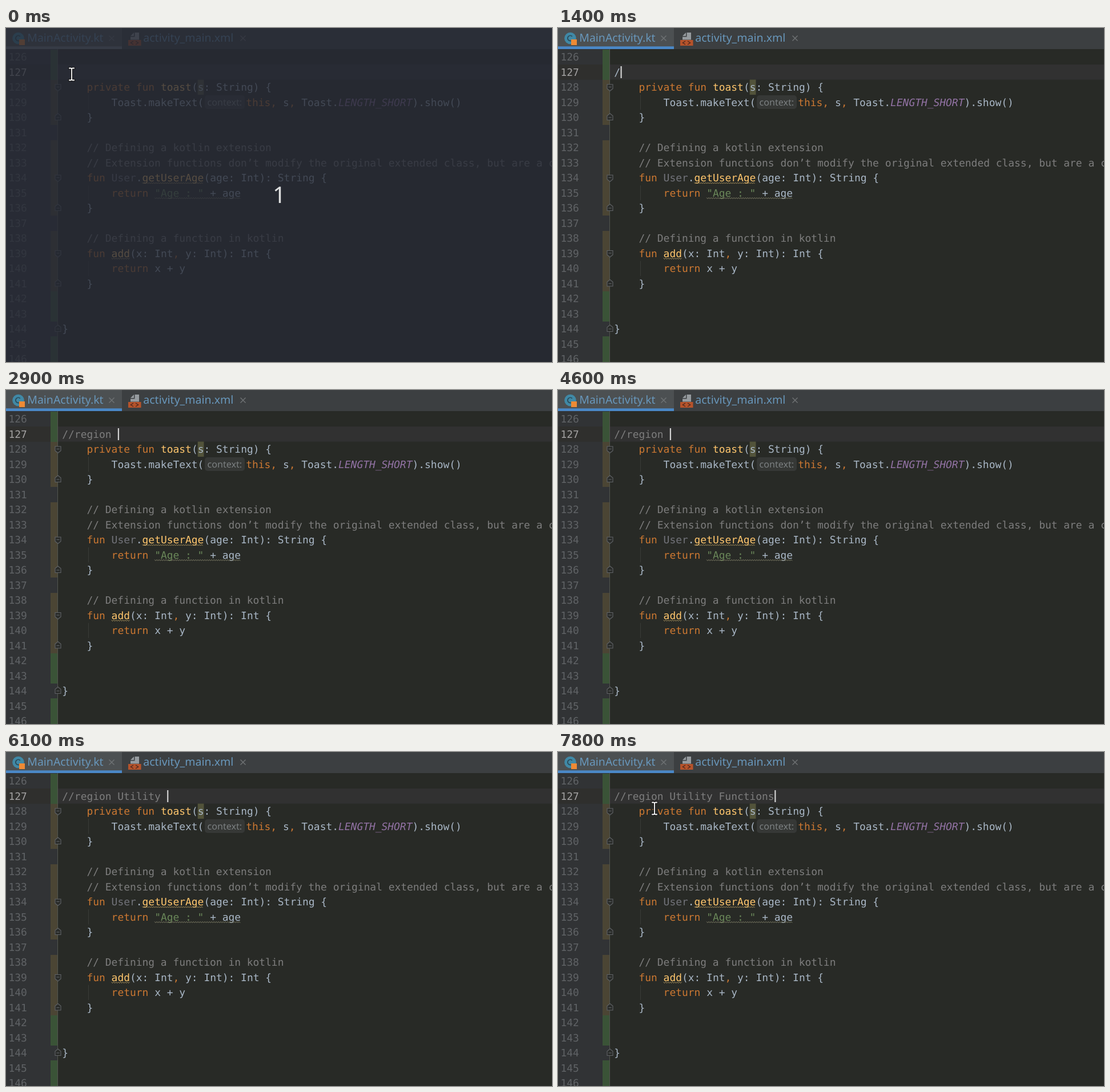
Recreate the animation shown at these times as an HTML page with a canvas. Size 956 px wide and 586 px high, loop 8 s.

```html
<!DOCTYPE html>
<html lang="en">
<head>
<meta charset="utf-8">
<title>Code editor</title>
<style>
  html, body { margin: 0; width: 100%; height: 100%; overflow: hidden; background: #282a26; }
  canvas { display: block; }
</style>
</head>
<body>
<canvas id="stage" width="956" height="586"></canvas>
<script>
const ctx = document.getElementById('stage').getContext('2d');
const W = 956, H = 586, LOOP = 8000;
const FIRST = 126, ROW = 26.5, LEFT = 98.3, CHAR = 10.79;
const MONO = '17.92px "DejaVu Sans Mono", monospace';
const SLASHES = '/'.repeat(2);
const sans = size => `${size}px "Noto Sans", sans-serif`;
const C = {
  text: '#a9b7c6', key: '#cc7832', fn: '#ffc66d', comment: '#7d7d7d', string: '#6a8759',
  constant: '#9373a5', unused: '#72737a', green: '#3a5337', brown: '#4b4534', line: '#606366'
};

// Each entry: row, column, then colour / text pairs.
const CODE = [
  [128, 4, 'key', 'private fun ', 'fn', 'toast', 'text', '(s: String) {'],
  [129, 8, 'text', 'Toast.makeText('],
  [130, 4, 'text', '}'],
  [132, 4, 'comment', SLASHES + ' Defining a kotlin extension'],
  [133, 4, 'comment', SLASHES + ' Extension functions don’t modify the original extended class, but are a convenient'],
  [134, 4, 'key', 'fun ', 'unused', 'User', 'text', '.', 'fn', 'getUserAge', 'text', '(age: Int): String {'],
  [135, 8, 'key', 'return ', 'string', '"Age : "', 'text', ' + age'],
  [136, 4, 'text', '}'],
  [138, 4, 'comment', SLASHES + ' Defining a function in kotlin'],
  [139, 4, 'key', 'fun ', 'fn', 'add', 'text', '(x: Int', 'key', ',', 'text', ' y: Int): Int {'],
  [140, 8, 'key', 'return ', 'text', 'x + y'],
  [141, 4, 'text', '}'],
  [144, 0, 'text', '}']
];
const CHANGES = [
  [126, 128, 'green'], [128, 131, 'brown'], [132, 137, 'brown'],
  [138, 142, 'brown'], [142, 144, 'green'], [145, 148, 'green']
];
const TYPED = SLASHES + 'region Utility Functions';
const KEY_TIMES = [
  1400, 1600, 1900, 2000, 2200, 2400, 2500, 2700, 2900,
  4900, 5200, 5300, 5500, 5700, 5800, 6000, 6100,
  6400, 6400, 6600, 6700, 6800, 7000, 7100, 7300, 7400
];

const rowTop = row => 37.6 + (row - FIRST) * ROW;
const baseline = row => rowTop(row) + 19.6;
const colX = col => LEFT + col * CHAR;

function rect(x, y, w, h, color) {
  ctx.fillStyle = color;
  ctx.fillRect(x, y, w, h);
}

function text(str, x, y, color, font = MONO) {
  ctx.font = font;
  ctx.fillStyle = color;
  ctx.fillText(str, x, y);
}

function path(points, closed) {
  ctx.beginPath();
  points.forEach(([x, y]) => ctx.lineTo(x, y));
  if (closed) ctx.closePath();
}

function stroke(color, width) {
  ctx.strokeStyle = color;
  ctx.lineWidth = width;
  ctx.stroke();
}

function tokens(x, y, parts) {
  for (let i = 0; i < parts.length; i += 2) {
    text(parts[i + 1], x, y, C[parts[i]]);
    x += parts[i + 1].length * CHAR;
  }
}

function wave(row, from, to, color) {
  const y = rowTop(row) + 21.5, points = [];
  for (let x = colX(from), i = 0; x <= colX(to); x += 2, i++) points.push([x, y + (i % 2) * 2]);
  path(points);
  stroke(color, 1);
}

function foldMark(row, dir) {
  const y = rowTop(row) + (dir > 0 ? 13.9 : 12.4);
  path([[86, y - 5.5 * dir], [96, y - 5.5 * dir], [96, y + 2 * dir], [91, y + 6 * dir], [86, y + 2 * dir]], true);
  ctx.fillStyle = '#2a2c2a';
  ctx.fill();
  stroke(C.line, 1.1);
  path([[88.5, y - dir], [93.5, y - dir]]);
  stroke(C.line, 1.1);
}

function closeMark(x) {
  for (const s of [-1, 1]) {
    path([[x - 4.5, 18 - 4.5 * s], [x + 4.5, 18 + 4.5 * s]]);
    stroke('#6e7274', 1.4);
  }
}

function tabs(focused) {
  rect(0, 0, W, 37, '#3c3f41');
  rect(0, 0, 203, 37, '#4c5052');
  rect(0, 32.3, 203, 4.7, focused ? '#4a88c7' : '#747a80');

  ctx.beginPath();
  ctx.arc(21.5, 18, 10.3, 0, 7);
  ctx.fillStyle = '#4089a6';
  ctx.fill();
  ctx.beginPath();
  ctx.arc(21.5, 18, 4.6, 0.8, 5.5);
  stroke('#2c4b58', 1.8);
  rect(23, 20, 10, 10, '#ee8a35');
  text('MainActivity.kt', 37.2, 24, '#6897bb', sans(19.5));
  closeMark(185);

  path([[225.5, 8], [233, 8], [233, 20.5], [218, 20.5], [218, 15.5], [225.5, 15.5]], true);
  ctx.fillStyle = '#969b9f';
  ctx.fill();
  path([[218, 14], [224, 8], [224, 14]], true);
  ctx.fill();
  rect(214, 21, 22.5, 10, '#b6532b');
  path([[223, 23], [218.5, 26], [223, 29]]);
  stroke('#512b20', 1.5);
  path([[227, 23], [231.5, 26], [227, 29]]);
  stroke('#512b20', 1.5);
  text('activity_main.xml', 240.3, 24, '#6897bb', sans(19.5));
  closeMark(415);
}

function editor() {
  rect(0, 37, W, H - 37, '#282a26');
  rect(0, 37, 91, H - 37, '#313335');
  rect(0, rowTop(127), W, ROW, '#313131');
  rect(0, rowTop(127), 78, ROW, '#2f2f2d');
  for (const [from, to, color] of CHANGES) {
    const top = Math.round(rowTop(from));
    rect(78, top, 13, Math.round(rowTop(to)) - top, C[color]);
  }
  rect(90, 37, 1, H - 37, '#52554f');

  for (let row = FIRST; row <= 146; row++) {
    text(row, 4.5, baseline(row), row === 127 ? '#a4a3a3' : C.line);
  }
  for (const row of [129, 135, 140]) rect(144, rowTop(row), 1, ROW, '#393b38');
  rect(colX(22), rowTop(128), CHAR, ROW, '#52533a');

  for (const [row, col, ...parts] of CODE) tokens(colX(col), baseline(row), parts);

  ctx.beginPath();
  ctx.roundRect(348, 118, 70, 24, 5);
  ctx.fillStyle = '#363836';
  ctx.fill();
  text('context:', 352.5, 136, '#7c8082', sans(16.1));
  const x = 420.2, y = baseline(129);
  tokens(x, y, ['key', 'this,', 'text', ' s', 'key', ',', 'text', ' Toast.']);
  text('LENGTH_SHORT', x + 15 * CHAR, y, C.constant, 'italic ' + MONO);
  tokens(x + 27 * CHAR, y, ['text', ').show()']);

  wave(134, 13, 23, '#b39a62');
  wave(135, 15, 29, '#85836b');
  wave(139, 8, 11, '#b39a62');
  for (const row of [128, 134, 139]) foldMark(row, 1);
  for (const row of [130, 136, 141, 144]) foldMark(row, -1);
}

function typing(t) {
  const count = KEY_TIMES.filter(k => k <= t).length;
  const slip = t >= 4100 && t < 4600 ? 'u' : '';
  const str = TYPED.slice(0, count) + slip;
  text(str, LEFT, baseline(127), count < 2 ? C.text : C.comment);
  if (t >= 500 && !(t >= 1100 && t < 1400)) {
    rect(colX(str.length) + 0.4, 67, 2.2, 21, '#d2d2d2');
  }
}

function pointer(x, y) {
  const beam = () => {
    ctx.beginPath();
    for (const s of [-1, 1]) {
      ctx.moveTo(x - 4, y + 10.5 * s);
      ctx.lineTo(x - 1.5, y + 10.5 * s);
      ctx.lineTo(x, y + 9.5 * s);
      ctx.lineTo(x + 1.5, y + 10.5 * s);
      ctx.lineTo(x + 4, y + 10.5 * s);
    }
    ctx.moveTo(x, y - 10);
    ctx.lineTo(x, y + 10);
  };
  ctx.lineCap = 'square';
  beam();
  stroke('#111', 4);
  beam();
  stroke('#fff', 1.8);
  ctx.lineCap = 'butt';
}

function draw() {
  const t = performance.now() % LOOP;
  ctx.textRendering = 'geometricPrecision';
  editor();
  tabs(t >= 500);
  typing(t);
  if (t < 200) {
    rect(0, 0, W, H, 'rgba(38, 42, 53, 0.78)');
    ctx.textAlign = 'center';
    text('1', 478.5, 307, '#dedfdf', sans(40));
    ctx.textAlign = 'left';
  }
  if (t < 500) pointer(115, 81);
  if (t >= 7800) pointer(169, 99);
  requestAnimationFrame(draw);
}
requestAnimationFrame(draw);
</script>
</body>
</html>
```
